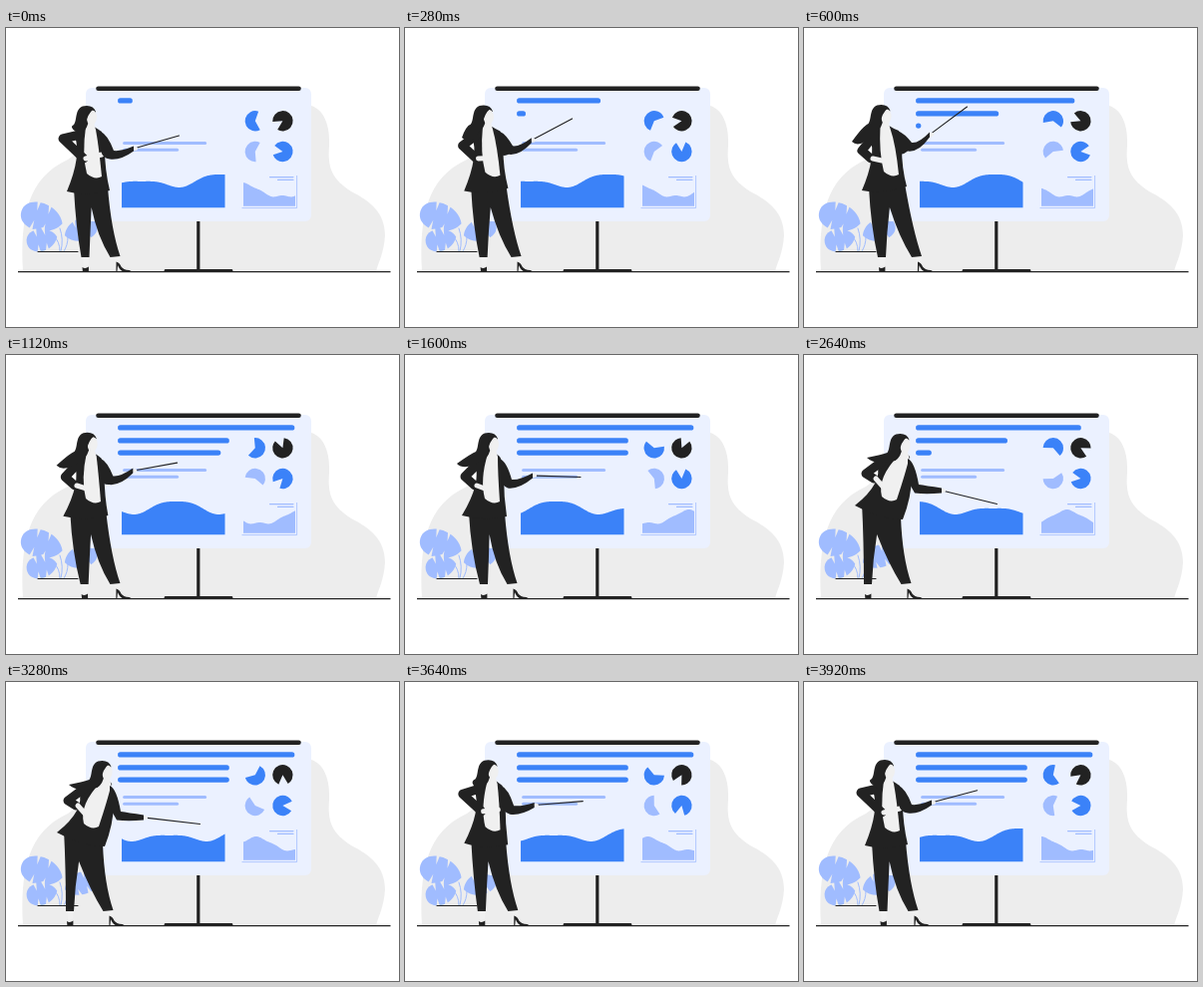
Write an HTML page with a canvas that moves like this. It is 394 px wide and 300 px high and loops after 3960 ms.

```html
<!DOCTYPE html>
<html lang="en">
<head>
<meta charset="utf-8">
<title>Presentation</title>
<style>
  html, body { margin: 0; width: 394px; height: 300px; overflow: hidden; background: #fff; }
  canvas { display: block; }
</style>
</head>
<body>
<canvas id="stage" width="394" height="300"></canvas>
<script>
const ctx = document.getElementById('stage').getContext('2d');
const LOOP = 3960, STEP = 40, TAU = Math.PI * 2;
const INK = '#222', BLUE = '#3b82f8', SKY = '#a0bcff', BOARD = '#ebf1ff', GREY = '#ededed', PALE = '#f0f0f0';

const clamp = v => Math.min(1, Math.max(0, v));
const mix = (a, b, p) => a + (b - a) * p;
const smooth = p => p * p * (3 - 2 * p);

function fill(d, color) {
  ctx.fillStyle = color;
  ctx.fill(new Path2D(d));
}

function stroke(d, color, width, cap = 'round') {
  ctx.strokeStyle = color;
  ctx.lineWidth = width;
  ctx.lineCap = cap;
  ctx.lineJoin = 'round';
  ctx.stroke(new Path2D(d));
}

function ellipse(x, y, rx, ry, color, tilt = 0) {
  ctx.fillStyle = color;
  ctx.beginPath();
  ctx.ellipse(x, y, rx, ry, tilt, 0, TAU);
  ctx.fill();
}

// Background and plant

function leaf(x, y, angle, length, width) {
  ctx.save();
  ctx.translate(x, y);
  ctx.rotate(angle);
  const l = length / 2, w = width / 2;
  fill(`M${-l} 0C${-l} ${-w * 1.5} ${l * .6} ${-w * 1.5} ${l} 0C${l * .6} ${w * 1.5} ${-l} ${w * 1.5} ${-l} 0Z`, SKY);
  for (const side of [-1, 1]) {
    for (const notch of [-.35, .2]) {
      const cx = l * notch, edge = side * w * 1.2;
      fill(`M${cx - 1.5} ${edge}L${cx + 2} ${edge}L${cx + 1} ${side * w * .4}Z`, GREY);
    }
  }
  ctx.restore();
}

function drawScene() {
  fill('M17 244C14 190 22 150 62 132L120 90L306 78C318 82 325 96 324 118C322 142 328 152 346 164C366 174 380 186 380 208C379 226 373 236 371 244Z', GREY);
  leaf(36, 190, .3, 43, 25);
  leaf(36, 212.5, -.2, 31, 20);
  leaf(75, 202.5, 2.8, 34, 20);
  stroke('M54 201Q58 212 55 224M48 209Q54 214 54 224M62 210Q62 218 58 224', SKY, 1);
  stroke('M32 224.5H72', INK, 1.1);
  ctx.fillStyle = BOARD;
  ctx.beginPath();
  ctx.roundRect(80, 60, 226, 134, 6);
  ctx.fill();
  stroke('M92.5 60.7H293.5', INK, 4.6);
  stroke('M192.8 194V243', INK, 3.2, 'butt');
  stroke('M160 243.4H226', INK, 2.8);
  stroke('M12 244.6H385.5', INK, 1.2, 'butt');
}

// Board contents

function bar(x, y, length, color, width) {
  stroke(`M${x} ${y}h${Math.max(.01, length)}`, color, width);
}

function drawBars(t) {
  const phase = t % (LOOP / 2);
  const keys = [[0, 9.5], [260, 74], [600, 154], [660, 160.5], [840, 172]];
  let first = 172;
  for (let i = 1; i < keys.length; i++) {
    const [t0, v0] = keys[i - 1], [t1, v1] = keys[i];
    if (phase >= t0 && phase < t1) first = mix(v0, v1, (phase - t0) / (t1 - t0));
  }
  bar(114.7, 72.9, first, BLUE, 5.3);
  [[268, 85.9], [625, 98.1]].forEach(([start, y]) => {
    if (phase < start - 30) return;
    const p = clamp((phase - start) / 690);
    bar(114.7, y, 106.5 * (1 - (1 - p) ** 2), BLUE, 5.3);
  });
  bar(118.6, 115.5, 81, SKY, 3);
  bar(118.6, 122.2, 53, SKY, 3);
}

function pie(x, y, middle, span, color) {
  const rad = Math.PI / 180;
  ctx.fillStyle = color;
  ctx.beginPath();
  ctx.moveTo(x, y);
  ctx.arc(x, y, 10.2, (middle - span / 2) * rad, (middle + span / 2) * rad);
  ctx.fill();
}

function drawPies(t) {
  const turn = 360 * t / LOOP;
  pie(249.8, 93.3, 175 + turn * 2, 228, BLUE);
  pie(277.4, 93.3, -32 + turn, 305, INK);
  pie(249.8, 124, 192 + turn, 213, SKY);
  pie(277.4, 124, 9 + turn * 3, 305, BLUE);
}

function wave(x0, x1, bottom, peak, period, mid, harmonics, color) {
  ctx.fillStyle = color;
  ctx.beginPath();
  ctx.moveTo(x0, bottom);
  for (let x = x0; x <= x1; x += .5) {
    const k = TAU * (x - peak) / period;
    ctx.lineTo(x, harmonics.reduce((y, h, i) => y - h * Math.cos((i + 1) * k), mid));
  }
  ctx.lineTo(x1, bottom);
  ctx.fill();
}

function drawCharts(t) {
  const p = t / LOOP;
  wave(116, 219.5, 180.3, 216 - 160 * p, 160, 154, [3.5, 4.7, 0, -1.1], BLUE);
  wave(238, 290, 178.7, 317 - 80 * p, 80, 163.5, [6.8, 1.2, -.3, .8], SKY);
  stroke('M236.5 180.6H291.6V148', SKY, .8, 'butt');
  stroke('M264.5 149.6H288M272.5 152.4H288', SKY, 1.1);
}

// Presenter: joints as [x, y]; cuffs holds the x of the back and front trouser cuff

const chest = {
  face: [86, 90], hair: [70, 104], backShoulder: [72, 104], backElbow: [57, 111], backHand: [78, 131], palm: [96, 127],
  shoulder: [96, 104], elbow: [108, 128], hand: [128, 121], hemLeft: [61, 164], hemRight: [104, 163], shirt: [89, 149], cuffs: [75.5, 104.5]
};
const raised = {
  face: [82.5, 89], hair: [48, 114], backShoulder: [69, 104], backElbow: [58, 123], backHand: [67, 131], palm: [78, 133],
  shoulder: [95, 103], elbow: [108, 120], hand: [126, 107], hemLeft: [58, 163], hemRight: [103, 159], shirt: [88, 147], cuffs: [74, 108]
};
const level = {
  face: [89, 90], hair: [52, 109], backShoulder: [73, 104], backElbow: [60, 122], backHand: [70, 131], palm: [80, 134],
  shoulder: [96, 104], elbow: [107, 130], hand: [128, 121], hemLeft: [57, 161], hemRight: [102, 162], shirt: [88, 147], cuffs: [75, 102.5]
};
const leaning = {
  face: [101.5, 91], hair: [63, 103], backShoulder: [76, 104], backElbow: [62, 119], backHand: [70, 124], palm: [80, 133],
  shoulder: [105, 104], elbow: [115, 135], hand: [138, 136], hemLeft: [51, 151], hemRight: [99, 165], shirt: [86, 145], cuffs: [60, 97.5]
};

// time, pose, pointer tip
const poses = [
  [0, chest, [173.5, 108]], [500, raised, [163.5, 79]], [850, raised, [163.5, 79]],
  [1300, level, [176, 124]], [2240, level, [176, 118]], [2620, leaning, [193.5, 149.5]],
  [3300, leaning, [194.5, 142.5]], [3760, chest, [175, 115]], [LOOP, chest, [173.5, 108]]
];

function poseAt(t) {
  const i = poses.findIndex(key => key[0] > t);
  const [t0, from, tip0] = poses[i - 1], [t1, to, tip1] = poses[i];
  const p = smooth((t - t0) / (t1 - t0));
  const blend = (a, b) => [mix(a[0], b[0], p), mix(a[1], b[1], p)];
  const pose = { tip: blend(tip0, tip1) };
  for (const joint in from) pose[joint] = blend(from[joint], to[joint]);
  return pose;
}

// "x y" of a joint with an optional offset
const at = ([x, y], dx = 0, dy = 0) => `${x + dx} ${y + dy} `;

function drawLegs({ hemLeft, hemRight, cuffs: [back, front] }) {
  const crotch = mix(back, front, .35);
  fill(`M${back + 1.5} 229h6l-.4 12h-5Z`, PALE);
  fill(`M${front + 4} 228h5l2 11h-5Z`, PALE);
  fill(`M${back + 1} 240q3 2 6.4 -.5v5h-6Z`, INK);
  fill(`M${front + 6} 234.5q3.5 1 5 5q2 3 8 3.6q3 1 1 1.6h-6q-4 -1 -6.5 -6.5l-.6 6.5h-1Z`, INK);
  fill(`M${at(hemLeft, 7, -3)}Q${at(hemLeft, 9, 36)}${back} 230h8Q${back + 9} 205 ${crotch} 180Q${front - 13} 209 ${front} 230l10 -1Q${front + 1} 203 ${at(hemRight, -2, -3)}Z`, INK);
}

function drawPresenter(t) {
  const j = poseAt(t);
  const { face, hair, backShoulder, backElbow, backHand, palm, shoulder, elbow, hand, hemLeft, hemRight, shirt, tip } = j;
  drawLegs(j);

  // jacket
  fill(`M${at(face, -7, 9)}Q${at(backShoulder, 0, -3)}${at(backShoulder, -3, 5)}Q${at(backShoulder, 4, 24)}${at(hemLeft)}Q${at(shirt, -10, 20)}${at(hemRight)}Q${at(shoulder, 3, 38)}${at(shoulder, 3, 17)}L${at(shoulder)}Q${at(face, 7, 12)}${at(face, 1, 8)}Z`, INK);

  // shirt and neck
  fill(`M${at(face, -4, 3)}L${at(face, 2, 5)}L${at(face, 4, 12)}Q${at(shoulder, -3, 14)}${at(shirt, 7)}Q${at(shirt, 0, 4)}${at(shirt, -8, -3)}Q${at(shirt, -13, -22)}${at(face, -6, 9)}Z`, PALE);

  // far arm with its hand
  stroke(`M${at(backShoulder, 2, 3)}L${at(backElbow)}L${at(backHand)}`, INK, 9);
  stroke(`M${at(backHand, 2)}L${at(palm)}`, PALE, 5);

  // head and hair
  fill(`M${at(face, 4, -6)}Q${at(face, 2, -12)}${at(face, -5, -12)}C${at(face, -18, -12)}${at(face, -14, 2)}${at(face, -18, 7)}Q${at(face, -23, 9)}${at(hair)}Q${at(hair, 8, 8)}${at(face, -10, 15)}Q${at(face, -4, 11)}${at(face, -3, 2)}Z`, INK);
  ellipse(face[0], face[1], 5, 7.5, PALE, .1);
  fill(`M${at(face, -6, 6)}Q${at(face, -4, -4)}${at(face, 1, -8)}L${at(face, -5, -9)}Z`, INK);

  // pointer and pointing arm
  const dx = tip[0] - hand[0], dy = tip[1] - hand[1], d = Math.hypot(dx, dy);
  stroke(`M${at(hand, dx / d * 3.5, dy / d * 3.5)}L${at(tip)}`, INK, 1.1);
  ellipse(hand[0] + 1.5, hand[1], 2.6, 2, PALE);
  fill(`M${at(shoulder, -1)}Q${at(shoulder, 6, 3)}${at(elbow, 0, -5)}Q${at(elbow, 7, -4)}${at(hand, 0, -2.5)}L${at(hand, 0, 2.5)}Q${at(elbow, 7, 5)}${at(elbow, -4, 3.5)}Q${at(shoulder, 1, 27)}${at(shoulder, -1, 19)}Z`, INK);
}

function draw(t) {
  ctx.fillStyle = '#fff';
  ctx.fillRect(0, 0, 394, 300);
  drawScene();
  drawBars(t);
  drawPies(t);
  drawCharts(t);
  drawPresenter(t);
}

const start = performance.now();
function tick() {
  const t = (performance.now() - start) % LOOP;
  draw(Math.floor(t / STEP) * STEP);
  requestAnimationFrame(tick);
}
tick();
</script>
</body>
</html>
```
